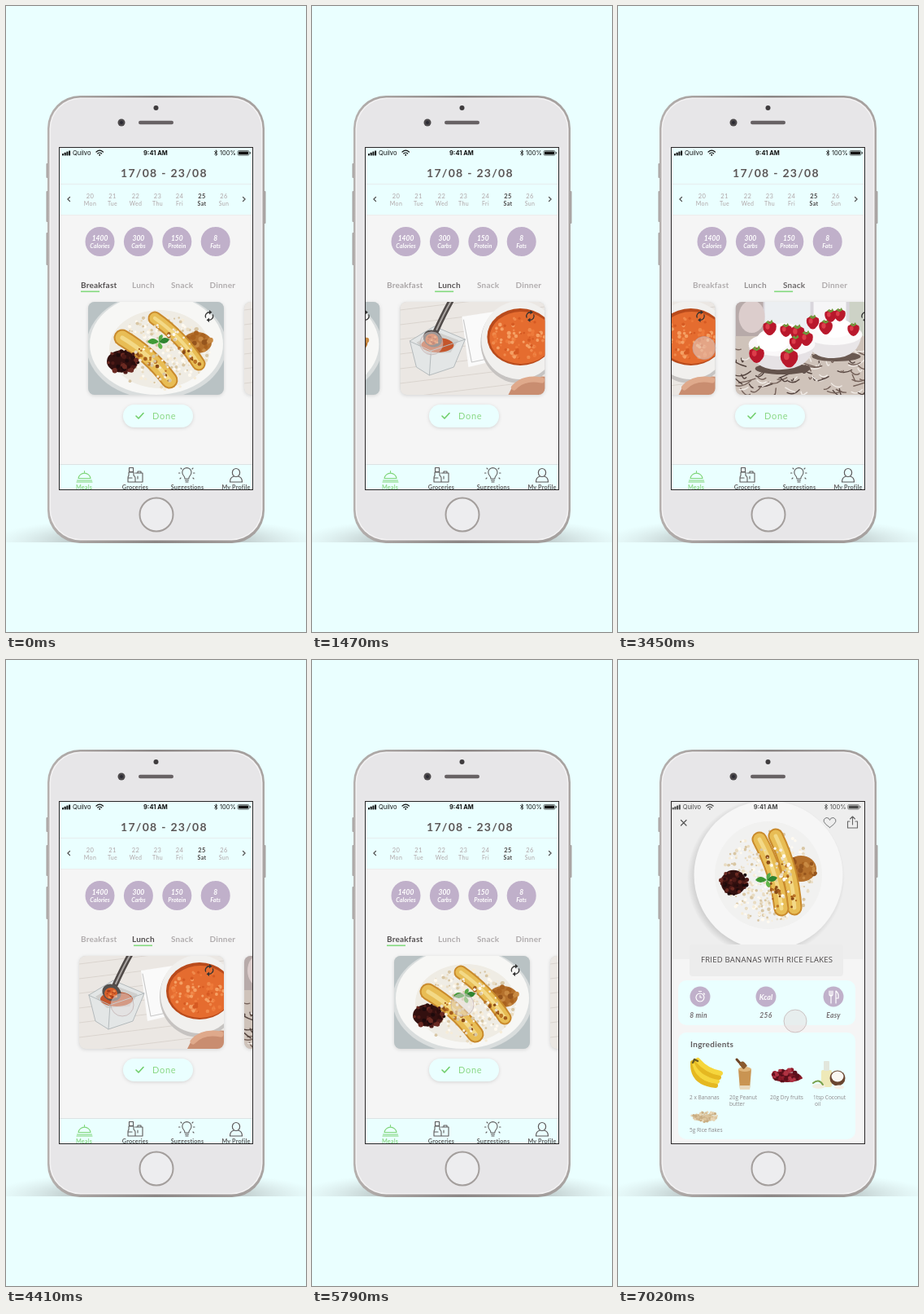
Recreate the animation shown at these times as an HTML page. Size 369 by 768 pixels, loop 8 s.

```html
<!DOCTYPE html>
<html lang="en">
<head>
<meta charset="utf-8">
<title>Meal planner</title>
<style>
html, body { margin: 0; width: 100%; height: 100%; overflow: hidden; background: #eaffff; }
svg { font-family: Lato, "Open Sans", sans-serif; }
#stage { display: block; width: 100vw; height: 100vh; }
.mid { text-anchor: middle; }
.b { font-weight: 700; }
.i { font-style: italic; font-weight: 700; }
.line { fill: none; stroke-linecap: round; stroke-linejoin: round; }
.soft { filter: drop-shadow(0 1px 2px #0002); }
.status text { font-family: Inter, Roboto, sans-serif; font-size: 7.5px; }
.small { font-family: "Open Sans", "Noto Sans", sans-serif; }
</style>
</head>
<body>
<svg id="stage" viewBox="0 0 369 768"></svg>
<script type="module">
const white = '#eaffff', grey = '#f5f5f5', lilac = '#c0b0ca';

let seed = 7;
const rnd = () => (seed = (seed * 16807) % 2147483647) / 2147483647;
const f = n => +n.toFixed(1);
const text = (x, y, s, size, fill, cls = '', more = '') =>
  `<text x="${x}" y="${y}" font-size="${size}" fill="${fill}" class="${cls}" ${more}>${s}</text>`;
const rect = (x, y, w, h, fill, r = 0, more = '') =>
  `<rect x="${x}" y="${y}" width="${w}" height="${h}" rx="${r}" fill="${fill}" ${more}/>`;
const oval = (x, y, rx, ry, fill, more = '') =>
  `<ellipse cx="${f(x)}" cy="${f(y)}" rx="${rx}" ry="${ry}" fill="${fill}" ${more}/>`;
const dot = (x, y, r, fill, more) => oval(x, y, r, r, fill, more);
const line = (d, color, w = 1, more = '') =>
  `<path d="${d}" class="line" stroke="${color}" stroke-width="${w}" ${more}/>`;
const shape = (d, fill, more = '') => `<path d="${d}" fill="${fill}" ${more}/>`;
const at = (x, y, s, more = '') => `<g transform="translate(${x} ${y})" ${more}>${s}</g>`;
const many = (n, fn) => Array.from({ length: n }, (_, i) => fn(i)).join('');
const pick = list => list[Math.floor(rnd() * list.length)];

// Scattered crumbs inside an ellipse
const crumbs = (n, x, y, rx, ry, colors, r) => many(n, () => {
  const a = rnd() * 2 * Math.PI, q = Math.sqrt(rnd());
  return dot(x + rx * q * Math.cos(a), y + ry * q * Math.sin(a), f(r * (.6 + rnd() * .8)), pick(colors));
});
const flakes = (n, x, y, rx, ry) => crumbs(n, x, y, rx, ry, ['#fffaf0', '#e9dcc2', '#f6ecd8', '#d8c6a4'], 1.6);
const fruits = (x, y, rx, ry) => oval(x, y, rx * .9, ry * .9, '#33100f') +
  crumbs(45, x, y, rx, ry, ['#2b0d0d', '#4d1a17', '#1d0a0c', '#6b2a22'], 2.2);
const butter = (x, y, rx, ry) => oval(x, y, rx, ry, '#b4702c') +
  crumbs(24, x, y, rx, ry, ['#96551d', '#c98a43', '#a9621f'], 2.6);
const mint = (x, y) => at(x, y,
  shape('M0 0Q-8-8-14 0Q-8 6 0 0Z', '#3f9a35') + shape('M0 0Q6-8 13-3Q9 5 0 0Z', '#2f8430') +
  shape('M0 0Q-3 8 3 9Q7 5 0 0Z', '#61b548') + shape('M0 0Q-2-8 4-9Q7-5 0 0Z', '#56a846'));
function banana(x1, y1, x2, y2, w) {
  const mx = (x1 + x2) / 2 + (y2 - y1) * .1, my = (y1 + y2) / 2 - (x2 - x1) * .1;
  const d = `M${x1} ${y1}Q${mx} ${my} ${x2} ${y2}`;
  return line(d, '#c98a2c', w) + line(d, '#e8bd55', w - 4) + line(d, '#f3d987', w * .25) +
    many(16, () => {
      const q = .25 + rnd() * .75;
      return dot(x1 + (x2 - x1) * q + (rnd() - .5) * w * .7, y1 + (y2 - y1) * q + (rnd() - .5) * w * .5,
        f(1 + rnd() * 1.6), pick(['#a45d1c', '#bb7426', '#8a4a16']));
    });
}
const berry = (x, y, s = 1) => at(x, y,
  `<g transform="scale(${s})">` + shape('M-9-6Q0-13 9-6Q12 2 4 9Q0 12-4 9Q-12 2-9-6Z', '#b9182c') +
  oval(-3, -2, 3, 4, '#dc3d4a') + shape('M-6-8L-2-11 0-8 3-12 5-8 0-5Z', '#6f9a3c') + '</g>');

const breakfast = rect(0, 0, 167, 114, '#b9c2c4') + oval(84, 54, 86, 65, '#d9dddd') +
  oval(84, 52, 82, 62, '#f7f7f5') + oval(88, 58, 62, 48, '#efece4') +
  flakes(260, 90, 62, 62, 46) + butter(134, 50, 18, 13) +
  banana(82, 20, 136, 76, 17) + banana(42, 44, 100, 96, 21) + fruits(41, 73, 20, 15) +
  flakes(70, 94, 62, 36, 36) + mint(87, 49);

const lunch = rect(0, 0, 178, 114, '#ebe7e3') +
  many(7, i => line(`M0 ${f(10 + i * 18)}L178 ${f(-12 + i * 18)}`, '#d6d0ca', .8)) +
  shape('M76 18L116 12 126 70 84 80Z', '#fafafa') + line('M78 22L88 74 126 66', '#c9c9c9', 1.2) +
  shape('M12 48L42 30 80 46 66 80 36 90 20 80Z', '#e3e6e6') +
  shape('M20 50L43 36 72 47 62 62 34 64Z', '#cfcfcd') + oval(46, 53, 20, 9, '#c4562c') +
  line('M12 48L42 30 80 46 38 60ZL20 80 36 90 38 60M36 90L66 80 80 46', '#b4babc', 1) +
  line('M63-2Q54 14 44 36', '#504a48', 7) + line('M62 0Q54 14 45 34', '#aaa5a2', 2) +
  oval(40, 45, 12, 10, '#55504e', 'transform="rotate(30 40 45)"') + oval(39, 46, 8, 7, '#d65f2a') +
  crumbs(12, 40, 47, 7, 5, ['#ee8a4b', '#a63c1a'], 1.3) +
  shape('M138 104Q156 88 180 92V116H132Z', '#c98d70') +
  oval(147, 50, 48, 50, '#c6c3c1') + oval(147, 47, 47, 48, '#f1f0ee') + oval(148, 43, 41, 35, '#b94b1c') +
  oval(149, 44, 39, 32, '#e56c2f') +
  crumbs(80, 149, 45, 35, 27, ['#f08a4c', '#d65a22', '#ee7a3a', '#f5a064'], 1.8) +
  line('M140 105Q152 92 174 96', '#dfa98b', 7);

const snack = rect(0, 0, 178, 114, '#d9d6dc') + rect(0, 0, 34, 60, '#b7aaa9') + rect(36, 0, 56, 38, '#eceff2') +
  rect(96, 0, 40, 34, '#f6f6f7') + rect(140, 0, 38, 46, '#cdd2c6') + rect(0, 42, 178, 72, '#cfc3ba') +
  oval(20, 18, 16, 20, '#dccdcc') +
  many(110, () => {
    const x = rnd() * 178, y = 54 + rnd() * 62, dx = (rnd() - .5) * 42, dy = (rnd() - .5) * 16;
    return line(`M${f(x)} ${f(y)}q${f(dx / 2)} ${f(dy + 4)} ${f(dx)} ${f(dy)}`, pick(['#54443f', '#75625a', '#f1ebe6']), 1.4);
  }) +
  oval(124, 67, 30, 6, '#6a5951') + shape('M86 42Q90 70 121 69Q152 68 155 40Z', '#e9e6e8') +
  oval(121, 40, 35, 13, '#fbfafa') + oval(122, 32, 22, 12, '#fff') +
  berry(95, 25, .8) + berry(111, 31, .85) + berry(117, 17, .75) + berry(128, 16, .75) + berry(145, 34, .75) +
  oval(58, 82, 34, 7, '#64534c') + shape('M16 54Q22 86 57 83Q92 82 98 52Z', '#e6e2e5') +
  oval(57, 52, 41, 15, '#faf8f9') + oval(46, 47, 20, 14, '#fff') + oval(60, 38, 20, 12, '#fff') +
  berry(42, 32, .85) + berry(62, 35, .75) + berry(76, 38, .9) + berry(74, 50, .8) + berry(87, 45, .85) +
  berry(26, 65, .95) + berry(66, 69, 1.1);

const sync = line('M-4.4 1.6A4.7 4.7 0 0 1 .5-4.7M4.4-1.6A4.7 4.7 0 0 1-.5 4.7', '#333', 1.3) +
  shape('M0-7.4L3.4-4.7 0-2ZM0 7.4L-3.4 4.7 0 2Z', '#333');
const card = (x, w, art) => at(x, 363, rect(0, 0, w, 114, '#d5dada', 8, 'class="soft"') +
  `<g clip-path="url(#clip${w})">${art}</g>` + at(w - 18, 17.5, sync));

const statusBar = `<g id="status" class="status">` +
  many(4, i => rect(69 + i * 2.7, f(181 - i * 1.2), 2, f(2.5 + i * 1.2), '#111', .4)) +
  text(82, 183, 'Quilvo', 7.5, '#111') +
  line('M111 179q4.2-3.6 8.4 0M112.7 181q2.5-2 5 0', '#111', 1.2) + dot(115.2, 182.8, 1, '#111') +
  text(169, 183, '9:41 AM', 7.5, '#111', 'b') +
  line('M256.5 178.5l3.5 3.2-1.8 1.8v-6.6l1.8 1.7-3.5 3.2', '#111', .8) +
  text(263, 183, '100%', 7.5, '#111') + rect(285, 177.5, 14, 5.6, 'none', 1.4, 'stroke="#111" stroke-width=".6"') +
  rect(286, 178.4, 12, 3.8, '#111', .6) + rect(299.7, 179.2, 1, 2.2, '#111') + '</g>';

const days = [[103.5, 20, 'Mon'], [131, 21, 'Tue'], [159.5, 22, 'Wed'], [186.5, 23, 'Thu'], [213.5, 24, 'Fri'], [241, 25, 'Sat'], [268, 26, 'Sun']];
const facts = [[1400, 'Calories'], [300, 'Carbs'], [150, 'Protein'], [8, 'Fats']];
const tabs = [[92, 'Breakfast'], [155, 'Lunch'], [203, 'Snack'], [250.5, 'Dinner']];

const header = rect(66, 174, 237, 82, white) +
  text(141, 210, '17/08 - 23/08', 14, '#5c5757', 'b', 'letter-spacing="1.3"') +
  rect(66, 218, 237, .8, '#e6e8ea') + rect(66, 256, 237, .8, '#ececec') +
  line('M78.5 234.5l-2.6 2.5 2.6 2.5M291.5 234.5l2.6 2.5-2.6 2.5', '#555', 1.2) +
  days.map(([x, n, d]) => {
    const on = n === 25, c = on ? '#4a4646' : '#b0a6a8', k = on ? 'mid b' : 'mid';
    return text(x, 236, n, 7.5, c, k, 'letter-spacing=".4"') + text(x, 244.5, d, 7, c, k, 'letter-spacing=".4"');
  }).join('') +
  facts.map(([n, s], i) => {
    const x = f(115.5 + i * 47.4);
    return dot(x, 289, 18, lilac) + text(x, 287.5, n, 8.5, '#fff', 'mid i') + text(x, 296.5, s, 7.2, '#fff', 'mid i');
  }).join('');

const tabBar = rect(66, 562, 237, 32, white) + rect(66, 562, 237, .8, '#d9dcde') +
  line('M87.5 582h18M89 579.5a7.6 7.6 0 0 1 15 0zM96.5 572v-1.5M87 584h19', '#7fd67a', 1.1) +
  line('M151 572h6v4q2 1 2 3v5h-9v-5q0-2 1-3zM151.5 566.5h5v5h-5zM159 573h9v11h-9M162 573v-2h4v2M150 579h5M162 577v3', '#5d595a', 1.1) +
  line('M220 580q0-2-1.7-4a5.6 5.6 0 1 1 8.2 0q-1.7 2-1.7 4zM220.5 582h4M221 584h3M214 573h-1.5M232 573h-1.5M216 568l-1-1M229 568l1-1M215 579l-1 1M230 579l1 1', '#5d595a', 1.1) +
  line('M283 567.5a4.6 5 0 0 1 0 10a4.6 5 0 0 1 0-10M275.5 584q0-6 5-7M290.5 584q0-6-5-7M275.5 584h15', '#5d595a', 1.2) +
  [[96, 'Meals', '#8cd987'], [159, 'Groceries', '#5d595a'], [223, 'Suggestions', '#5d595a'], [283, 'My Profile', '#5d595a']]
    .map(([x, s, c]) => text(x, 593, s, 7.2, c, 'mid b', 'letter-spacing=".2"')).join('');

const done = rect(144, 489, 86, 28, white, 14, 'class="soft"') + line('M160 503l3 3 6-6.5', '#6fce6a', 1.6) +
  text(180, 507, 'Done', 11, '#8ad885', '', 'letter-spacing=".7"');

const dish = rect(0, 0, 237, 193, '#eeeeee') +
  dot(116, 93, 97, 'url(#plate)') + dot(119, 90, 91.5, '#f6f6f6') + dot(119, 90, 66, '#f1f1f0') +
  flakes(330, 119, 92, 55, 56) + butter(159, 82, 19, 16) +
  banana(128, 42, 151, 130, 19) + banana(108, 46, 135, 131, 19) + fruits(76, 99, 17, 17) +
  flakes(70, 122, 92, 26, 40) + mint(117, 96);

const label = (x, y, s) => text(x, y, s, 6.5, '#8b8789', 'small');
const bunch = many(4, i => line(`M${92 + i * 2} ${494 - i}Q${91 + i * 6} ${519 - i * 5} ${120 + i * 2} ${522 - i * 5}`, i % 2 ? '#f6d63c' : '#e5b821', 6)) +
  line('M92 494l2-4 4 2', '#6b5a22', 2.5);
const jar = shape('M148 502H164L162 527H150Z', '#c99452') + oval(156, 502, 8, 3, '#e0b67b') +
  line('M155 500L146 490', '#6e4526', 3) + shape('M149 496Q153 488 159 498L154 502Z', '#8a5a2e') + rect(150, 522, 12, 5, '#e8d8bd');
const coconut = rect(250, 503, 13, 21, '#eee9b8', 2) + rect(253, 492, 7, 12, '#e2e6dc', 1) +
  dot(270, 513, 9.5, '#6a4630') + oval(270, 511, 7.5, 6.5, '#faf8f2') + oval(247, 523, 8, 3, '#f2eee2') +
  line('M240 519q7-6 12 2', '#78a04a', 2) + oval(272, 524, 6, 2.5, '#f5f1e8');

const sheet = rect(88, 349, 189, 39, '#ececec', 4) +
  text(102, 371, 'FRIED BANANAS WITH RICE FLAKES', 9.5, '#4b4748', 'small', 'letter-spacing=".25"') +
  rect(74, 393, 218, 55, white, 10) + rect(74, 457, 218, 131, white, 10) +
  [101, 182, 265].map(x => dot(x, 413, 12.5, lilac)).join('') +
  line('M101 409a5 5 0 1 1-.1 0M101 411.5v2.5h2M99.5 406.5h3M105.5 409l1 1', '#fff', 1.2) +
  text(182, 416.5, 'Kcal', 9, '#fff', 'mid i') +
  line('M260 406v4q0 2 2 2t2-2v-4M262 406v15M268 421v-15q4 3 3 9h-3', '#fff', 1.2) +
  [[99, '8 min'], [182, '256'], [265, 'Easy']].map(([x, s]) => text(x, 439, s, 8.5, '#777073', 'mid i', 'letter-spacing=".3"')).join('') +
  text(89, 475, 'Ingredients', 10, '#615c5e', 'b', 'letter-spacing=".3"') +
  bunch + jar + oval(208, 512, 18, 6, '#7d1724') + crumbs(50, 208, 510, 19, 8, ['#8f1a2a', '#5c0f1b', '#b03343'], 2.2) + coconut +
  oval(107, 562, 15, 4, '#d9c3a0') + crumbs(60, 107, 560, 17, 6, ['#e8d6b5', '#c9ae83', '#dcc59c'], 1.5) +
  label(88, 539, '2 x Bananas') + label(137, 539, '20g Peanut') + label(137, 547, 'butter') +
  label(187, 539, '20g Dry fruits') + label(240, 539, '1tsp Coconut') + label(242, 547, 'oil') + label(88, 579, '5g Rice flakes');

const tools = line('M77.5 196.5l6.5 6.5M84 196.5l-6.5 6.5', '#555', 1.2) +
  line('M260.5 205.5Q248 197 256 193.5Q259.5 193 260.5 196.5Q261.5 193 265 193.5Q273 197 260.5 205.5Z', '#77797a') +
  line('M285 198h-2.5v8h12v-8H292M288.5 202v-10M285.5 195l3-3 3 3', '#666', 1.1);

const phone = `<ellipse cx="184" cy="657" rx="205" ry="30" fill="url(#shade)" clip-path="url(#floor)"/>` +
  [[49.5, 193, 18], [49.5, 227, 38], [49.5, 278, 40], [316.5, 227, 40]].map(([x, y, h]) => rect(x, y, 3, h, '#a9a5a4', 1)).join('') +
  rect(51, 110, 267, 549, 'url(#rim)', 40) + rect(53.5, 112.5, 262, 543, '#f3f2f3', 38) + rect(55, 114, 259, 540, '#e7e6e8', 37) +
  dot(142, 143, 4.5, '#4c494b') + dot(142, 143, 2, '#2b2a33') + dot(184.5, 125, 3, '#3f3c3e') + rect(163, 140.8, 43, 4.4, '#676264', 2.2) +
  dot(185, 624, 20.5, '#ededef', 'stroke="#a39e9c" stroke-width="2"');

document.getElementById('stage').innerHTML = `<defs>
  <clipPath id="clip167">${rect(0, 0, 167, 114, '#000', 8)}</clipPath>
  <clipPath id="clip178">${rect(0, 0, 178, 114, '#000', 8)}</clipPath>
  <clipPath id="screen">${rect(66, 174, 237, 420, '#000')}</clipPath>
  <clipPath id="floor">${rect(0, 600, 369, 58, '#000')}</clipPath>
  <radialGradient id="shade"><stop offset=".4" stop-color="#8b8f8f" stop-opacity=".6"/><stop offset="1" stop-color="#c5cccc" stop-opacity="0"/></radialGradient>
  <radialGradient id="plate"><stop offset=".9" stop-color="#cfcfcf"/><stop offset="1" stop-color="#eeeeee"/></radialGradient>
  <linearGradient id="rim"><stop stop-color="#b5b0ae"/><stop offset=".5" stop-color="#8b8685"/><stop offset="1" stop-color="#aaa5a3"/></linearGradient>
</defs>` + rect(0, 0, 369, 768, white) + phone +
  `<g clip-path="url(#screen)">` + rect(66, 174, 237, 420, grey) +
  `<g id="list">` + header + tabs.map(([x, s], i) => text(x, 346, s, 10, '#aaa', 'b', `letter-spacing=".2" id="tab${i}"`)).join('') +
  rect(92, 349.5, 23, 1.6, '#83da7e', 0, 'id="mark"') +
  `<g id="strip">${card(101, 167, breakfast)}${card(293, 178, lunch)}${card(496, 178, snack)}</g>` + done + tabBar + '</g>' +
  `<g id="detail">` + rect(66, 174, 237, 420, grey, 0, 'id="paper"') +
  `<svg id="hero" viewBox="0 0 237 193" preserveAspectRatio="xMidYMid slice">${dish}</svg>` +
  `<g id="sheet">${sheet}</g><g id="tools">${tools}</g></g>` + statusBar +
  dot(0, 0, 14, '#e4dddd', 'id="touch" fill-opacity=".5" stroke="#b9a3a3" stroke-opacity=".6"') + '</g>' +
  rect(65.5, 173.5, 238, 420, 'none', 0, 'stroke="#2a2728"');

const set = (id, attrs) => Object.entries(attrs).forEach(([k, v]) => document.getElementById(id).setAttribute(k, v));
const lerp = (a, b, q) => a + (b - a) * q;

// Standard "ease" curve: cubic-bezier(.25, .1, .25, 1)
function ease(x) {
  if (x <= 0 || x >= 1) return x <= 0 ? 0 : 1;
  const bez = (s, a, b) => 3 * s * (1 - s) ** 2 * a + 3 * s * s * (1 - s) * b + s ** 3;
  let lo = 0, hi = 1;
  for (let i = 0; i < 24; i++) {
    const m = (lo + hi) / 2;
    if (bez(m, .25, .25) < x) lo = m; else hi = m;
  }
  return bez(lo, .1, 1);
}
const ramp = (t, start, len = 600) => ease((t - start) / len);

// Finger: time, x, y
const path = [[390, 150, 200], [870, 225, 423], [1080, 225, 423], [1680, 140, 413], [1890, 225, 413], [2250, 225, 413],
  [2850, 125, 413], [3180, 90, 418], [3330, 90, 418], [3930, 143, 423], [4410, 143, 423], [5010, 225, 423],
  [5490, 185, 423], [6720, 185, 423], [7020, 218, 443]];
function finger(t) {
  const i = Math.max(0, path.filter(k => k[0] <= t).length - 1);
  const a = path[i], b = path[i + 1] || a;
  const q = a === b ? 0 : ramp(t, a[0], b[0] - a[0]);
  return [lerp(a[1], b[1], q), lerp(a[2], b[2], q)];
}

function draw() {
  const t = performance.now() % 8000;
  const page = ramp(t, 1088) + ramp(t, 2260) - ramp(t, 3338) - ramp(t, 4415);
  set('strip', { transform: `translate(${-203 * page} 0)` });
  set('mark', { x: page < 1 ? 92 + 65 * page : 157 + 48 * (page - 1) });
  tabs.forEach((_, i) => {
    const v = Math.round(176 - 92 * Math.max(0, 1 - Math.abs(page - i)));
    set('tab' + i, { fill: `rgb(${v},${v - 4},${v - 3})` });
  });

  const d = ramp(t, 5850, 640);
  set('detail', { display: d ? 'inline' : 'none' });
  set('paper', { opacity: d });
  set('hero', { x: lerp(101, 66, d), y: lerp(363, 174, d), width: lerp(167, 237, d), height: lerp(114, 193, d), opacity: Math.min(1, d * 3) });
  set('sheet', { transform: `translate(0 ${200 * (1 - d)})`, opacity: d });
  set('tools', { opacity: d });
  set('list', { opacity: 1 - d });
  set('status', { transform: `translate(${-2.3 * d} 0)`, opacity: 1 - .25 * d });

  const [x, y] = finger(t);
  set('touch', { cx: x, cy: y, opacity: ramp(t, 390, 480) });
  requestAnimationFrame(draw);
}
draw();
</script>
</body>
</html>
```
